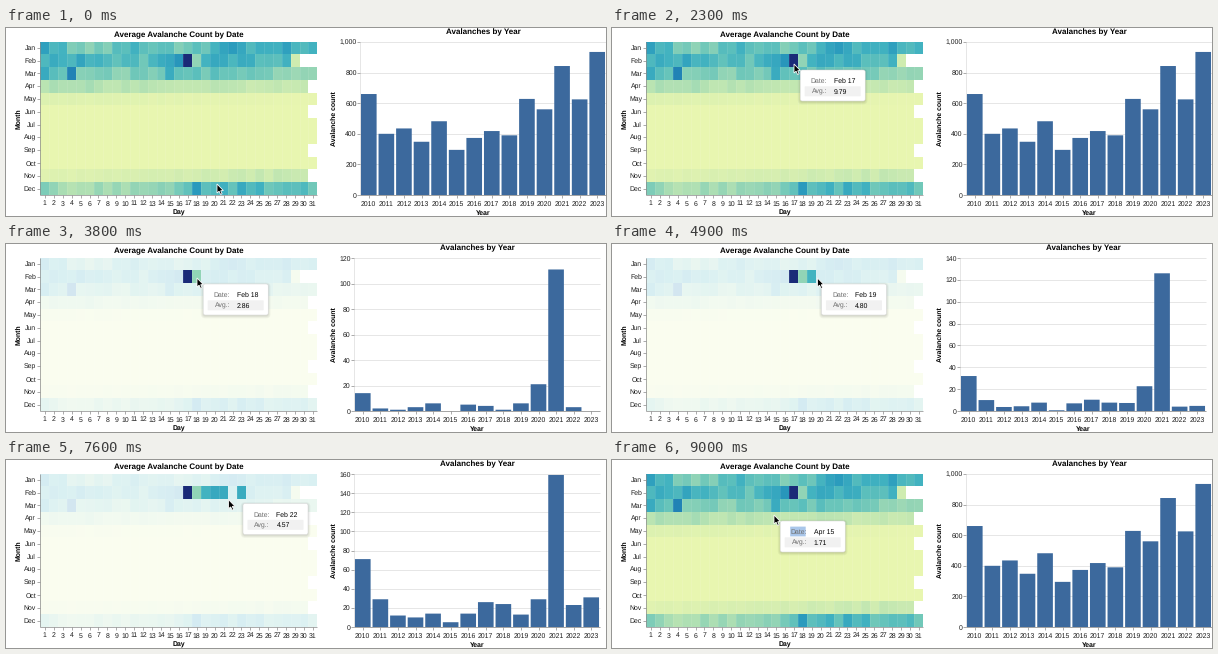
These frames come from a looping animation (600x188 px, 9.1 s). A matplotlib script:

```python
import numpy as np
import matplotlib.pyplot as plt
from matplotlib.animation import FuncAnimation
from matplotlib.colors import LinearSegmentedColormap
from matplotlib.patches import FancyBboxPatch, Polygon, Rectangle
from matplotlib.transforms import Affine2D

W, H, DPI = 600, 188, 100
PX = 72 / DPI
FRAMES, STEP = 91, 100
plt.rcParams.update({"font.family": "Liberation Sans", "text.hinting": "none"})

MONTHS = "Jan Feb Mar Apr May Jun Jul Aug Sep Oct Nov Dec".split()
LEFT, RIGHT, TOP, BOTTOM = 34.4, 311.4, 13.5, 167
CELL_W, CELL_H = (RIGHT - LEFT) / 31, (BOTTOM - TOP) / 12
PLOT_W, PLOT_H = 246, 153
PEAK = 9.79
INK, GRID, AXIS, BAR = "#1c1c1c", "#dcdcdc", "#8a8a8a", "#3c699d"

ylgnbu = LinearSegmentedColormap.from_list("ylgnbu", [
    "#e9f6b0", "#d5eeb0", "#b8e3b2", "#8dd2b6", "#62c2bb", "#40b1c0",
    "#2a9bbd", "#2080b5", "#2061a8", "#214598", "#1a2a78"])

# Daily averages: a rough curve (day, value) per snowy month, plus jitter
SEASON = {
    "Jan": [(1, 4.9), (6, 3.0), (11, 4.3), (17, 3.1), (21, 5.1), (31, 4.8)],
    "Feb": [(1, 4.3), (4, 4.9), (12, 4.0), (16, 6.7), (19, 5.0), (28, 4.2)],
    "Mar": [(1, 4.6), (7, 3.0), (20, 4.0), (31, 2.8)],
    "Apr": [(1, 2.2), (31, 1.4)],
    "May": [(1, 0.6), (31, 0.1)],
    "Nov": [(1, 0.5), (31, 1.6)],
    "Dec": [(1, 3.4), (3, 2.3), (14, 2.8), (22, 4.6), (31, 3.8)],
}
NOTABLE = {"Feb 17": PEAK, "Feb 18": 2.86, "Feb 21": 5.21, "Feb 22": 4.57,
           "Feb 23": 5.14, "Feb 29": 1.2, "Mar 4": 6.8, "Mar 15": 5.2,
           "Apr 15": 1.71, "Dec 18": 5.9}


def daily_averages():
    rng = np.random.default_rng(4)
    days = np.arange(1, 32)
    v = np.empty((12, 31))
    for row, name in enumerate(MONTHS):
        curve = np.array(SEASON.get(name, [(1, 0.05)]))
        mean = np.interp(days, curve[:, 0], curve[:, 1])
        v[row] = np.maximum(mean * (1 + rng.uniform(-0.17, 0.17, 31)), 0)
        short = name in ("Apr", "Jun", "Sep", "Nov")
        v[row, 29 if name == "Feb" else 31 - short:] = np.nan
    for date, value in NOTABLE.items():
        name, day = date.split()
        v[MONTHS.index(name), int(day) - 1] = value
    return v


VALUES = daily_averages()

# Yearly counts, 2010 to 2023: whole year, Feb 17-18, Feb 17-21
ALL = np.array([660, 400, 435, 348, 482, 295, 373, 418, 390, 628, 560, 843, 625, 935])
TWO_DAYS = np.array([14, 2, 1, 3, 6, 0, 5, 4, 1, 6, 21, 111, 3, 0])
FIVE_DAYS = np.array([68, 26, 9, 7, 11, 2, 11, 23, 21, 10, 26, 156, 6, 14])

# When each February day joins the selection, and when it is cleared
CLICKS = [(2700, 17), (3500, 18), (4700, 19), (5200, 20), (5600, 21), (6900, 23)]
RESET = 8600


def day_counts(day):
    share = VALUES[1, 16] / (VALUES[1, 16] + VALUES[1, 17])
    if day == 17:
        return TWO_DAYS * share
    if day == 18:
        return TWO_DAYS * (1 - share)
    if day <= 21:
        return (FIVE_DAYS - TWO_DAYS) / 3
    return np.where(np.arange(14) < 12, 3, 17)


def selected_days(t):
    return [day for start, day in CLICKS if start <= t < RESET]


# Pointer stops: arrival time, x, y
STOPS = [(0, 211, 156), (900, 189, 37), (2200, 182, 36), (3600, 191, 34),
         (4600, 201, 34), (5100, 210, 34), (5600, 219, 35), (6600, 235, 36),
         (7500, 230.8, 37.5), (8300, 165, 55), (8700, 162, 55)]
TRAVEL = 800


def pointer(t):
    x, y = STOPS[0][1:]
    for (t0, x0, y0), (t1, x1, y1) in zip(STOPS, STOPS[1:]):
        span = min(t1 - t0 - STEP, TRAVEL) if t1 < 7500 else t1 - t0
        u = np.clip((t - t1 + span) / span, 0, 1)
        if u > 0:
            x, y = x0 + (x1 - x0) * u, y0 + (y1 - y0) * u
    return x, y


fig = plt.figure(figsize=(W / DPI, H / DPI), dpi=DPI, facecolor="white")
ax = fig.add_axes([0, 0, 1, 1])


def text(x, y, s, size=6.9, ha="center", color=INK, **kw):
    """Text whose capitals are centred on y."""
    return ax.text(x, y + 0.36 * size, s, fontsize=size * PX, ha=ha,
                   va="baseline", color=color, **kw)


def title(x, y, s, size=6.9):
    return text(x, y, s, size, weight="bold", color="black")


def side_title(x, y, s):
    return ax.text(x, y, s, fontsize=6.9 * PX, weight="bold", rotation=90,
                   ha="center", va="center", color="black")


def line(x0, y0, x1, y1, color=AXIS, width=0.7, **kw):
    return ax.plot([x0, x1], [y0, y1], color=color, lw=width * PX,
                   solid_capstyle="butt", **kw)[0]


def heat_colors(days):
    rgb = ylgnbu(np.nan_to_num(VALUES) / PEAK)[..., :3]
    if days:
        keep = np.zeros(VALUES.shape, bool)
        keep[1, [d - 1 for d in days]] = True
        rgb = np.where(keep[..., None], rgb, 1 - (1 - rgb) * 0.2)
    rgb[np.isnan(VALUES)] = 1
    return rgb


def draw_heatmap():
    xs = np.linspace(LEFT, RIGHT, 32)
    ys = np.linspace(TOP, BOTTOM, 13)
    mesh = ax.pcolormesh(xs, ys, heat_colors([]), zorder=1)
    for x in xs[1:-1]:
        line(x, TOP, x, BOTTOM, "white", 0.5, alpha=0.18, zorder=2)
    for name, y in zip(MONTHS, ys + CELL_H / 2):
        line(LEFT - 3, y, LEFT, y)
        text(LEFT - 4.3, y, name, ha="right")
    for day, x in enumerate(xs[:-1] + CELL_W / 2, 1):
        line(x, BOTTOM, x, BOTTOM + 3)
        text(x, 175, str(day))
    line(LEFT, TOP, LEFT, BOTTOM)
    line(LEFT, BOTTOM, RIGHT, BOTTOM)
    title(173, 6.5, "Average Avalanche Count by Date", 8)
    title(173, 184, "Day")
    side_title(13, 91, "Month")
    return mesh


def draw_bars(days):
    """One complete bar chart for a selection; returns its artists."""
    counts = sum(day_counts(d) for d in days) if days else ALL
    tick = 20 if days else 200
    top = int(np.ceil(counts.max() / tick)) * tick
    x0 = 348 if days else 354
    x1 = x0 + PLOT_W
    pitch = PLOT_W / 14
    parts = []
    for value in range(0, top + 1, tick):
        y = BOTTOM - value / top * PLOT_H
        parts += [line(x0, y, x1, y, GRID, zorder=1),
                  line(x0 - 3, y, x0, y),
                  text(x0 - 3.3, y, f"{value:,}", ha="right")]
    for i, n in enumerate(counts):
        x = x0 + (i + 0.5) * pitch
        h = n / top * PLOT_H
        bar = Rectangle((x - pitch * 0.445, BOTTOM - h), pitch * 0.89, h,
                        facecolor=BAR, lw=0, zorder=2, snap=False)
        parts += [ax.add_patch(bar), line(x, BOTTOM, x, BOTTOM + 3),
                  text(x, 175, str(2010 + i))]
    mid = (x0 + x1) / 2
    return parts + [line(x0, BOTTOM - PLOT_H, x0, BOTTOM, GRID, zorder=1),
                    line(x0, BOTTOM, x1, BOTTOM, zorder=3),
                    title(mid, 3.6, "Avalanches by Year", 8),
                    title(mid, 184, "Year")]


def make_tooltip(shift):
    place = shift + ax.transData

    def box(x, y, w, h, color, r=2.0, z=10, **kw):
        p = FancyBboxPatch((x, y), w, h, facecolor=color, zorder=z,
                           boxstyle=f"round,pad=0,rounding_size={r}", **kw)
        p.set_transform(place)
        return ax.add_patch(p)

    parts = [box(-g, 1 - g, 65 + 2 * g, 31 + 2 * g, "black", 2 + g,
                 alpha=0.035, lw=0) for g in (2.4, 1.6, 0.8, 0.2)]
    parts.append(box(0, 0, 65, 31, "white", ec="#d8d8d8", lw=0.5 * PX, z=11))
    parts.append(box(4.5, 16.3, 56, 10, "#f1f1f1", 0.6, lw=0, z=12))
    mark = box(10, 5.6, 15.5, 9.8, "#a9c6ea", 0.1, lw=0, z=12)
    style = dict(zorder=13, transform=place)
    for y, key in ((10.6, "Date:"), (21.2, "Avg.:")):
        parts.append(text(27, y, key, ha="right", color="#6e6e6e", **style))
    date = text(33.5, 10.6, "", ha="left", color="black", **style)
    avg = text(33.5, 21.2, "", ha="left", color="black", **style)
    return parts + [date, avg], mark, date, avg


def make_cursor(shift):
    shape = [(0, 0), (0, 9), (2.1, 7.2), (3.6, 10.5), (5.1, 9.8),
             (3.7, 6.7), (6.4, 6.6)]
    arrow = Polygon(shape, facecolor="black", edgecolor="white",
                    lw=0.8 * PX, zorder=20)
    arrow.set_transform(shift + ax.transData)
    ax.add_patch(arrow)


heat = draw_heatmap()
selections = [selected_days(t) for t in [0] + [start for start, _ in CLICKS]]
charts = [draw_bars(days) for days in selections]
side_title(328.5, 90.5, "Avalanche count")
tip_shift, cursor_shift = Affine2D(), Affine2D()
tip_parts, tip_mark, tip_date, tip_avg = make_tooltip(tip_shift)
make_cursor(cursor_shift)
ax.set(xlim=(0, W), ylim=(H, 0))
ax.axis("off")


def show_tooltip(t):
    # The tooltip trails the pointer by one step
    x, y = pointer(max(t - STEP, 0))
    col, row = int((x - LEFT) // CELL_W), int((y - TOP) // CELL_H)
    value = VALUES[row, col]
    visible = t > 0 and not np.isnan(value)
    for part in tip_parts:
        part.set_visible(visible)
    tip_mark.set_visible(visible and t >= RESET)
    if visible:
        tip_date.set_text(f"{MONTHS[row]} {col + 1}")
        tip_avg.set_text(f"{value:.2f}")
    tip_shift.clear().translate(x + 6.2, y + 6)


def update(frame):
    t = frame * STEP
    days = selected_days(t)
    heat.set_array(heat_colors(days))
    for selection, parts in zip(selections, charts):
        for part in parts:
            part.set_visible(selection == days)
    show_tooltip(t)
    cursor_shift.clear().translate(*pointer(t))
    return []


anim = FuncAnimation(fig, update, frames=FRAMES, interval=STEP,
                     init_func=lambda: [], repeat=True, repeat_delay=0)
plt.show()
```
